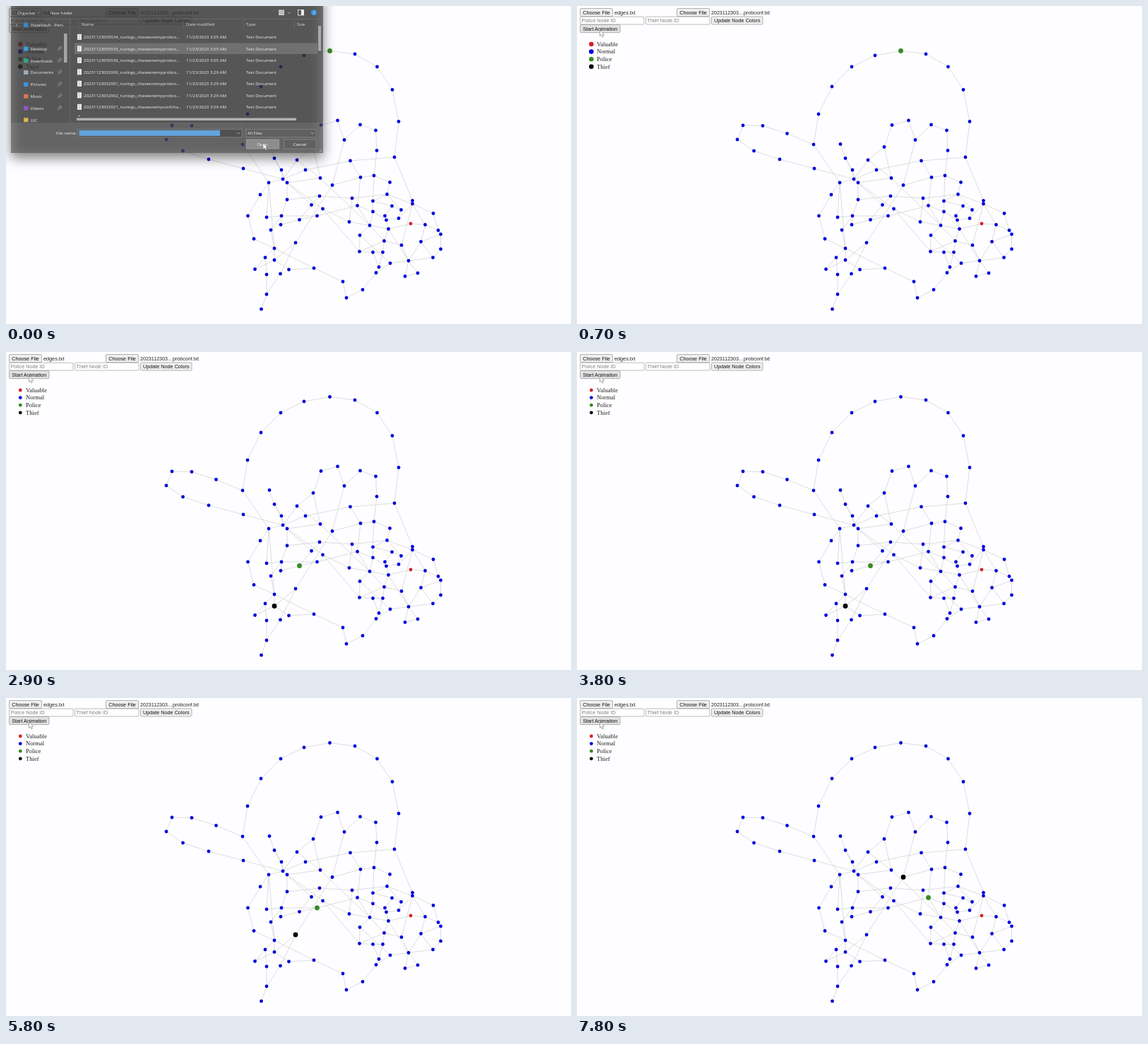
Write an HTML page that moves like this. It is 800x450 px and loops after 8 s.

```html
<!DOCTYPE html>
<html lang="en">
<head>
<meta charset="utf-8">
<title>Police and thief chase</title>
<style>
  html, body { margin: 0; width: 100%; height: 100%; overflow: hidden; background: #fefdff; }
  svg { display: block; width: 800px; height: 450px; }
  .ui { font-family: "Liberation Sans", Arial, sans-serif; font-size: 7.25px; }
  .legend { font-family: "Liberation Serif", Times, serif; font-size: 8.6px; }
  .dialog { font-family: "Open Sans", sans-serif; font-size: 6.1px; }
</style>
</head>
<body>
<svg id="stage" viewBox="0 0 800 450">
  <defs><filter id="blur" x="-20%" y="-30%" width="140%" height="160%"><feGaussianBlur stdDeviation="9"/></filter></defs>
</svg>
<script>
const LOOP = 8000, STEP = 2000, START = 800;
const BLUE = '#0000dc', GREEN = '#378b22', RED = '#d6222a', BLACK = '#000';
const stage = document.getElementById('stage');

function add(parent, tag, attrs, text) {
  const el = document.createElementNS('http://www.w3.org/2000/svg', tag);
  for (const key in attrs) el.setAttribute(key, attrs[key]);
  if (text) el.textContent = text;
  parent.append(el);
  return el;
}
const group = (cls, parent = stage) => add(parent, 'g', { class: cls });
const box = (g, x, y, width, height, fill, more) => add(g, 'rect', { x, y, width, height, fill, ...more });
const label = (g, x, y, text, fill = '#000', more) => add(g, 'text', { x, y, fill, ...more }, text);
const dot = (g, cx, cy, r, fill) => add(g, 'circle', { cx, cy, r, fill });
const line = (g, d, stroke, width = 0.7) => add(g, 'path', { d, stroke, 'stroke-width': width, fill: 'none' });

// Routes through the network: consecutive points are joined.
const outerRoutes = [
  '372,250 335,196 342,153 361,114 389,86 422,70 458.5,63.5 494,68 525.5,86 547,118.5 556,163.5 550,214 575.5,275.5',
  '335,196 297.5,180.5 263,169.5 235,169 227,189 250.5,205 287,217 336,230 392,245',
  '550,214 487.5,219 424,232 392,245',
  '392,245 412,218 435,199.5 446,168.5 469.5,162 479,189.5 501.5,168 523.5,176 525,204.5 521,240',
  '435,199.5 445,243.5 398,250',
  '479,189.5 462,253.5',
  '373,195.5 380,215.5 390,232 392,245',
  '380,215.5 398,250'
];
const westRoutes = [
  '392,245 372,250 360,267 342.5,297 351,329.5 380,343 436,371 477,390 482,413 505,401.5 524,377.5 544,364',
  '372,250 369,299 390,297 440.5,297 497.5,282.5',
  '372,250 380,343',
  '398,250 398,274 444,269 490,272',
  '398,274 390,297 389,309.5 415.5,302.5 440.5,297',
  '390,297 375,317 380,343 380,359.5 400.5,373 436,371',
  '444,269 432.5,281.5 415.5,302.5',
  '392,245 432.5,281.5',
  '380,343 367,356 352.5,372.5 380,359.5 410,335 462,253.5',
  '367,356 369,380 369,408 361.5,429',
  '369,408 388.5,379 410,335'
];
const eastRoutes = [
  '412,218 445,243.5 515,310.5',
  '398,250 448.5,287 500.5,347.5',
  '448.5,287 486,305.5 515,310.5 541.5,315.5 573,308 593.5,309.5 612,317.5 615.5,323 615.5,344 604.5,356 570,360.5 544,364 501,324.5',
  '462,253.5 502,242.5 521,240 543.5,249.5 539.5,266.5 490,272 486,305.5',
  '487.5,219 502,242.5 497.5,282.5 515,310.5 501,324.5 500.5,347.5 519.5,348.5 533.5,348.5',
  '521,240 519.5,276 519.5,291 538.5,303 541.5,315.5',
  '497.5,282.5 519.5,291 515,310.5 535.5,332.5 500.5,347.5',
  '519.5,276 546.5,283 559.5,288.5 556,300.5 538.5,303 536.5,297 546.5,283',
  '539.5,266.5 575.5,280 605,293.5 612,317.5',
  '519.5,276 539.5,266.5 559.5,288.5',
  '541.5,315.5 535.5,332.5 533.5,348.5 528,369.5 524,377.5',
  '519.5,348.5 528,369.5',
  '535.5,332.5 560,338.5 570,360.5 565,382.5 583,378 570,360.5 587.5,333.5 604.5,356',
  '593.5,309.5 587.5,333.5 615.5,323',
  '575.5,275.5 575.5,280 593.5,309.5',
  '556,300.5 575.5,280 560,338.5',
  '541.5,315.5 570,360.5'
];

const edges = group('edges'), nodes = group('nodes'), nodeAt = {};
for (const route of [...outerRoutes, ...westRoutes, ...eastRoutes]) {
  line(edges, 'M' + route.replaceAll(' ', 'L'), '#cbcbcd', 0.65);
  for (const key of route.split(' '))
    nodeAt[key] ??= dot(nodes, ...key.split(','), 2.4, BLUE);
}
nodeAt['573,308'].setAttribute('fill', RED);

const policePath = ['458.5,63.5', '432.5,281.5', '415.5,302.5', '440.5,297', '497.5,282.5'];
const thiefPath = [null, '352.5,372.5', '380,359.5', '410,335', '462,253.5'];
const police = dot(stage, 0, 0, 3.4, GREEN), thief = dot(stage, 0, 0, 3.4, BLACK);

// Page controls
const page = group('ui');
function button(x, y, width, text) {
  const face = box(page, x, y, width, 11.2, '#efefef', { rx: 1.4, stroke: '#858585', 'stroke-width': 0.6 });
  label(page, x + width / 2, y + 8.2, text, '#111', { 'text-anchor': 'middle' });
  return face;
}
function input(x, hint) {
  box(page, x, 15.2, 90.5, 10.8, '#fff', { rx: 1, stroke: '#909090', 'stroke-width': 0.6 });
  label(page, x + 2, 23.2, hint, '#808080');
}
button(4.5, 3.5, 46, 'Choose File');
label(page, 53, 11.7, 'edges.txt', '#222');
const chooseButton = button(141.5, 3.5, 46, 'Choose File');
label(page, 190, 11.7, '2023112303…probconf.txt', '#222', { 'font-size': 7.1 });
input(4.5, 'Police Node ID');
input(97.5, 'Thief Node ID');
button(190.5, 14.9, 72.5, 'Update Node Colors');
const startButton = button(4.5, 26.4, 56.5, 'Start Animation');

const legend = group('legend');
const legendDots = [['Valuable', RED], ['Normal', BLUE], ['Police', GREEN], ['Thief', BLACK]].map(([name, color], i) => {
  label(legend, 28, 56.7 + i * 10.7, name, '#222');
  return dot(legend, 20.3, 54 + i * 10.6, 3.3, color);
});

// File dialog, caught while it fades out
const dialog = group('dialog');
box(dialog, 7, -20, 442, 228, '#000', { opacity: 0.5, filter: 'url(#blur)', transform: 'translate(0 7)' });
box(dialog, 7, 0, 442, 165, '#404040', { opacity: 0.63 });
box(dialog, 7, 165, 442, 43, '#565656', { opacity: 0.63 });
const PALE = '#f0f0f0', SOFT = '#c4c4c4';
const say = (x, y, text, fill = PALE, more) => label(dialog, x, y + 2.2, text, fill, more);
const chevron = (x, y) => line(dialog, `M${x - 2} ${y - 1}l2 2l2-2`, SOFT);

say(16, 9.5, 'Organize');
chevron(45, 9.5);
say(63, 9.5, 'New folder');
box(dialog, 386, 5.5, 8, 7.5, '#d0d0d0');
line(dialog, 'M386 8h8m-8 2.5h8', '#777', 0.6);
chevron(401, 9.5);
box(dialog, 413.5, 5.5, 8, 7.5, 'none', { stroke: PALE, 'stroke-width': 0.8 });
box(dialog, 418, 5.5, 3.5, 7.5, PALE);
dot(dialog, 436, 9.3, 4, '#3f94e0');
say(436, 9.3, '?', '#fff', { 'text-anchor': 'middle' });
line(dialog, 'M7 18.5H449', '#777', 0.5);

dot(dialog, 28, 27, 3.4, '#3488cf');
line(dialog, 'M14 25l2 2l-2 2', SOFT);
say(35, 27, 'HazeVault - Pers');
const places = [['Desktop', '#3aa0d8'], ['Downloads', '#35a587'], ['Documents', '#9aacbd'],
  ['Pictures', '#3d92dc'], ['Music', '#d87652'], ['Videos', '#9356c4'], ['UIC', '#d9b652']];
places.forEach(([name, color], i) => {
  const y = 60.5 + i * 16.8;
  box(dialog, 25, y - 3, 6.5, 6, color, { rx: 1 });
  say(34.5, y, name);
  if (i < 6) line(dialog, `M73 ${y + 2.5}l2-2m-1-2l3 3m-2-3l2-2l2 2l-2 2`, SOFT);
});
box(dialog, 82, 39, 4.5, 41, '#a5a5a5');
line(dialog, 'M90.5 19V165', '#777', 0.5);

[[107, 'Name'], [255, 'Date modified'], [340, 'Type'], [412, 'Size']].forEach(([x, name]) => {
  say(x, 26, name, '#dedede');
  line(dialog, `M${x - 4} 20v13`, '#818181', 0.4);
});
box(dialog, 97, 52.5, 344, 15.5, '#a0a0a0', { opacity: 0.35 });
const logs = ['030534', '030535', '030536', '032900', '032901', '032902', '032921'];
logs.forEach((stamp, i) => {
  const y = 43.8 + i * 16.5;
  box(dialog, 101, y - 4, 6, 8, '#f2f2f2');
  line(dialog, `M102.2 ${y - 2}h3.6m-3.6 2h3.6m-3.6 2h3.6`, '#888', 0.5);
  say(110, y, `20231123${stamp}_runlogs_chaseenemy${i < 6 ? 'probco' : 'confcha'}...`);
  say(255, y, `11/23/2023 3:${i < 3 ? '05' : '29'} AM`);
  say(340, y, 'Text Document');
});
box(dialog, 442, 28, 4, 35.5, '#aaa');
box(dialog, 100, 158.5, 311, 3.5, '#b0b0b0');
line(dialog, 'M102 155.5h3', PALE);

say(71, 180, 'File name:');
const field = { stroke: '#929292', 'stroke-width': 0.6 };
box(dialog, 102, 174.3, 232, 11.5, '#505050', field);
box(dialog, 103.5, 175.8, 199.5, 8, '#62a5dc');
chevron(329, 180);
box(dialog, 339.5, 174.3, 99.5, 11.5, '#606060', field);
say(342, 180, 'All Files');
chevron(434, 180);
box(dialog, 340.5, 189, 46, 13, '#8c8c8c', { ...field, stroke: '#b5b5b5' });
box(dialog, 393.5, 189, 45.5, 13, '#606060', field);
say(363, 195.5, 'Open', '#fff', { 'text-anchor': 'middle' });
say(416, 195.5, 'Cancel', '#fff', { 'text-anchor': 'middle' });
line(dialog, 'M444 206l3-3m-1 3l1-1', SOFT);

const cursor = add(stage, 'path', {
  d: 'M0 0V8.6L2 6.8L3.4 10L4.9 9.3L3.5 6.3H6.2Z', fill: '#fff', stroke: '#777', 'stroke-width': 0.6
});

function place(marker, key) {
  marker.style.display = key ? '' : 'none';
  if (!key) return;
  const [x, y] = key.split(',');
  marker.setAttribute('cx', x);
  marker.setAttribute('cy', y);
}

function render(t) {
  const step = t < START ? 0 : Math.min(4, 1 + Math.floor((t - START) / STEP));
  place(police, policePath[step]);
  place(thief, thiefPath[step]);
  legendDots.forEach(d => d.setAttribute('r', step ? 2.4 : 3.3));

  dialog.style.display = t < 100 ? '' : 'none';
  const p = Math.min(1, Math.max(0, (t - 100) / 500)), eased = 1 - (1 - p) ** 2;
  const [x, y] = t < 100 ? [364, 194] : [267.5 - 235 * eased, 163 - 129 * eased];
  cursor.setAttribute('transform', `translate(${x} ${y})`);
  chooseButton.setAttribute('fill', t < 300 ? '#dcdcdc' : '#efefef');
  startButton.setAttribute('fill', x < 61 && y < 38 ? '#e2e2e2' : '#efefef');
}

function tick() {
  render(performance.now() % LOOP);
  requestAnimationFrame(tick);
}
tick();
</script>
</body>
</html>
```
